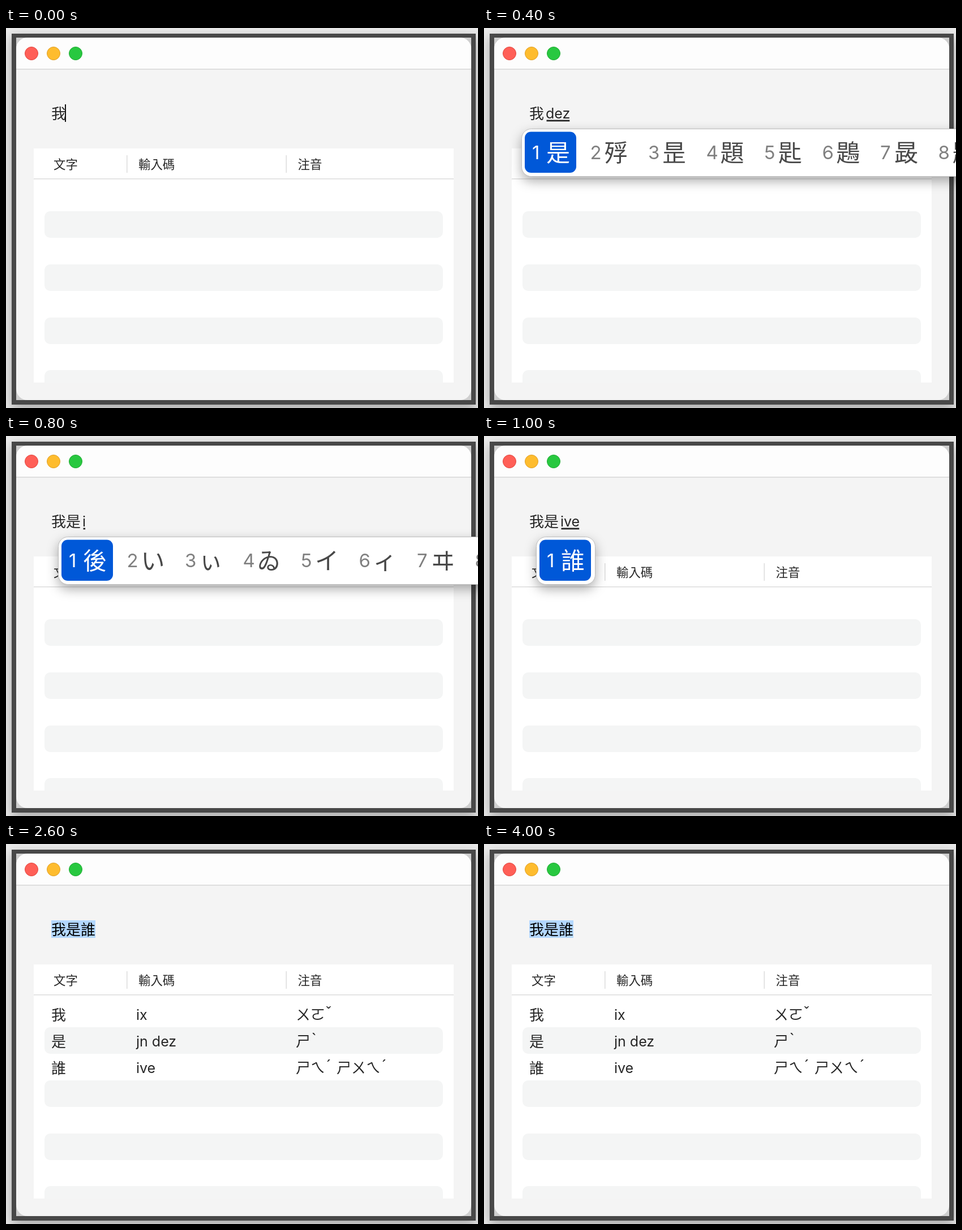
Animation, 834 px wide and 672 px high, one loop 6370 ms. Source, as an HTML page:

```html
<!DOCTYPE html>
<html lang="zh-Hant">
<head>
<meta charset="utf-8">
<title>輸入碼查詢</title>
<style>
  html, body { margin: 0; width: 100%; height: 100%; overflow: hidden; background: #ebebeb; }
  svg { display: block; width: 834px; height: 672px; }
  text { fill: #262626; white-space: pre; }
  .cjk { font-family: "Noto Sans CJK TC", "Noto Sans CJK", "Noto Sans CJK JP", sans-serif; }
  .latin { font-family: Inter, Roboto, sans-serif; }
  .tone { font-family: "Noto Sans", "Noto Sans CJK TC", sans-serif; text-anchor: middle; }
  .frame { fill: #484848; filter: drop-shadow(0 7px 10px rgba(0, 0, 0, .3)); }
  .popup { filter: drop-shadow(0 8px 10px rgba(0, 0, 0, .32)); }
</style>
</head>
<body>
<svg id="stage" viewBox="0 0 834 672"></svg>
<script>
const LOOP = 6370;
const stage = document.getElementById('stage');

function add(parent, tag, attrs, content) {
  const node = document.createElementNS('http://www.w3.org/2000/svg', tag);
  for (const key in attrs) node.setAttribute(key, attrs[key]);
  if (content !== undefined) node.textContent = content;
  return parent.appendChild(node);
}
const rect = (parent, x, y, width, height, fill, more) =>
  add(parent, 'rect', { x, y, width, height, fill, ...more });
const label = (parent, cls, x, y, size, content, style = '') =>
  add(parent, 'text', { class: cls, x, y, 'font-size': size, style }, content);

function drawWindow() {
  add(stage, 'rect', { class: 'frame', x: 10, y: 10, width: 820, height: 656 });
  rect(stage, 18, 17, 804, 641, '#cfcfcf');
  rect(stage, 18, 17, 804, 641, '#f4f4f4', { rx: 20 });
  add(stage, 'path', { d: 'M18 72V37a20 20 0 0 1 20-20H802a20 20 0 0 1 20 20V72Z', fill: '#fdfdfd' });
  rect(stage, 18, 72, 804, 1.5, '#d8d8d8');
  [['#ff5f57', '#e2463f'], ['#febc2e', '#e0a028'], ['#28c840', '#1fab33']].forEach(([fill, stroke], i) =>
    add(stage, 'circle', { cx: 45 + 39 * i, cy: 45, r: 11.5, fill, stroke }));

  rect(stage, 49, 213, 742, 414, '#fff');
  rect(stage, 49, 266, 742, 1.5, '#dcdcdc');
  for (const x of [213, 494.5]) rect(stage, x, 225, 1.5, 31, '#dcdcdc');
  [[84, '文字'], [234, '輸入碼'], [515.5, '注音']].forEach(([x, s]) => label(stage, 'cjk', x, 248.5, 21.4, s));
  for (let i = 0; i < 3; i++) rect(stage, 68, 324 + 94 * i, 704, 47, '#f4f5f5', { rx: 10 });
  add(stage, 'path', { d: 'M68 627V615a10 10 0 0 1 10-10H762a10 10 0 0 1 10 10V627Z', fill: '#f4f5f5' });
}

// Zhuyin symbols are full width; tone marks are half width and raised.
function drawZhuyin(parent, x, y, content) {
  for (const ch of content) {
    const tone = 'ˇˋˊ'.includes(ch);
    if (tone) label(parent, 'tone', x + 5, y - 4, 25, ch);
    else if (ch !== ' ') label(parent, 'cjk', x - 1, y, 26, ch);
    x += tone ? 13 : ch === ' ' ? 7 : 26;
  }
}

function drawResults(parent) {
  const rows = [['我', 'ix', 'ㄨㄛˇ'], ['是', 'jn dez', 'ㄕˋ'], ['誰', 'ive', 'ㄕㄟˊ ㄕㄨㄟˊ']];
  rows.forEach(([word, code, sound], i) => {
    const y = 311 + 47 * i;
    label(parent, 'cjk', 80, y + 0.5, 26, word);
    label(parent, 'latin', 230, y, 25, code);
    drawZhuyin(parent, 513, y, sound);
  });
}

function drawPopup(parent, x, candidates) {
  const pitch = 102.5;
  const width = candidates.length > 1 ? 900 : 104;
  const popup = add(parent, 'g', { class: 'popup' });
  rect(popup, x + 0.5, 178.5, width, 84, '#fff', { rx: 17, stroke: '#bdbdbd' });
  rect(parent, x + 6, 183.5, 91, 72.5, '#0058d8', { rx: 11 });
  [...candidates].forEach((ch, i) => {
    const left = x + pitch * i;
    label(parent, 'latin', left + 19, 232, 33, i + 1, `fill:${i ? '#808080' : '#fff'}`);
    label(parent, 'cjk', left + 44, 236, 42, ch, `font-weight:500;fill:${i ? '#484848' : '#fff'}`);
  });
}

function drawState({ text, code, candidates, caret, selected }) {
  const group = add(stage, 'g', { visibility: 'hidden' });
  const end = 80 + 26 * text.length;
  if (selected) {
    rect(group, 80, 135, end - 80, 31, '#b3d7ff');
    drawResults(group);
  }
  label(group, 'cjk', 80, 160.5, 26, text, selected ? 'fill:#000' : '');
  if (caret) rect(group, end - 2, 135, 2, 31, '#111');
  if (code) {
    const node = label(group, 'latin', end + 3, 160, 25, code);
    rect(group, end + 4.5, 162.5, node.getComputedTextLength() - 2.5, 2.8, '#262626');
    drawPopup(group, end - 40, candidates);
  }
  return group;
}

drawWindow();
const steps = [
  { at: 0, text: '我', caret: true },
  { at: 100, text: '我', code: 'd', candidates: '的' },
  { at: 300, text: '我', code: 'de', candidates: '得でデ' },
  { at: 400, text: '我', code: 'dez', candidates: '是殍昰題匙鶗晸尟' },
  { at: 600, text: '我是', caret: true },
  { at: 800, text: '我是', code: 'i', candidates: '後いぃゐイィヰ井' },
  { at: 900, text: '我是', code: 'iv', candidates: 'い' },
  { at: 1000, text: '我是', code: 'ive', candidates: '誰' },
  { at: 1700, text: '我是誰', caret: true },
  { at: 2200, text: '我是誰' },
  { at: 2600, text: '我是誰', selected: true },
].map(step => ({ at: step.at, group: drawState(step) }));

let shown;
function tick() {
  const time = performance.now() % LOOP;
  const { group } = steps.findLast(step => step.at <= time);
  if (group !== shown) {
    shown?.setAttribute('visibility', 'hidden');
    group.setAttribute('visibility', 'visible');
    shown = group;
  }
  requestAnimationFrame(tick);
}
tick();
</script>
</body>
</html>
```
